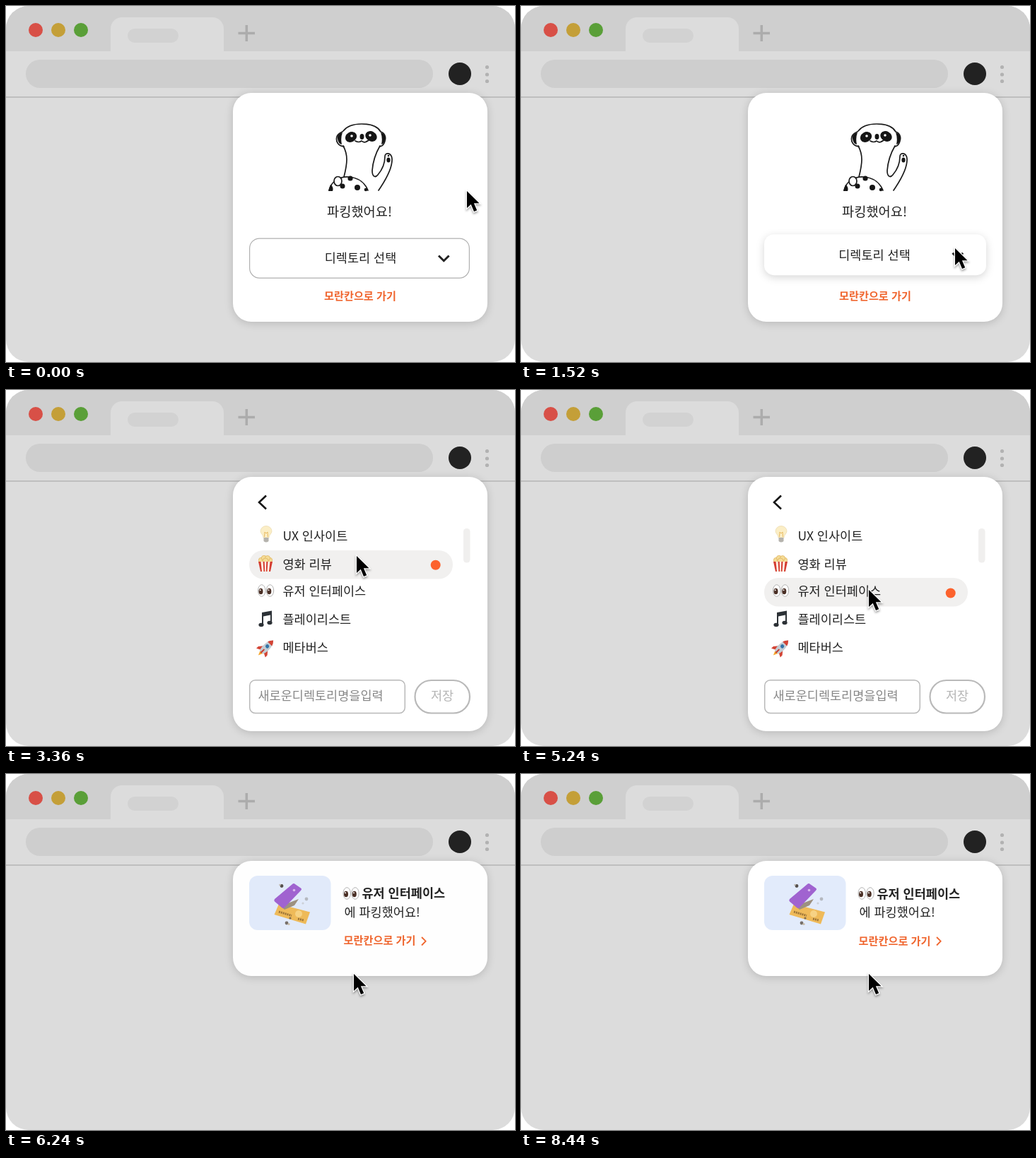
Recreate the animation shown at these times as an HTML page. Size 720 by 504 pixels, loop 8.48 s.

```html
<!DOCTYPE html>
<html lang="ko">
<head>
<meta charset="utf-8">
<style>
html, body { margin: 0; width: 100%; height: 100%; overflow: hidden; background: #fff; }
svg { display: block; width: 720px; height: 504px; }
text { font: 500 17.5px "Noto Sans CJK KR", "Noto Sans CJK JP", "Noto Sans CJK", sans-serif; fill: #222; }
.mid { text-anchor: middle; }
.link { font-size: 15.2px; font-weight: 700; fill: #f0662f; }
.panel { fill: #fff; filter: drop-shadow(0 2px 6px rgba(0,0,0,.16)); }
.line { fill: none; stroke: #1b1b1b; stroke-width: 1.7; stroke-linecap: round; stroke-linejoin: round; }
</style>
</head>
<body>
<svg viewBox="0 0 720 504">
  <defs>
    <clipPath id="frame"><rect width="720" height="504" rx="32"/></clipPath>
    <g id="eyes">
      <g id="eye">
        <ellipse cx="-5.8" rx="5.2" ry="8.3" fill="#fff" stroke="#aaa" stroke-width=".9"/>
        <ellipse cx="-7" cy="1" rx="3" ry="4.3" fill="#4a2f25"/>
        <circle cx="-7.8" cy="-.8" r="1" fill="#fff"/>
      </g>
      <use href="#eye" x="11.8"/>
    </g>
  </defs>

  <!-- browser window -->
  <g clip-path="url(#frame)">
    <rect width="720" height="504" fill="#dcdcdc"/>
    <rect width="720" height="64" fill="#cfcfcf"/>
    <path d="M148 64V32a16 16 0 0 1 16-16H292a16 16 0 0 1 16 16V64Z" fill="#dcdcdc"/>
    <rect x="172" y="32" width="72" height="20" rx="10" fill="#d2d2d2"/>
    <circle cx="42" cy="34" r="10" fill="#d85047"/>
    <circle cx="74" cy="34" r="10" fill="#c49f38"/>
    <circle cx="106" cy="34" r="10" fill="#5a9f38"/>
    <path d="M328.500 38.500H352M340.300 27V50" stroke="#acacac" stroke-width="3.500"/>
    <rect x="28" y="76" width="576" height="40" rx="20" fill="#cecece"/>
    <rect y="128" width="720" height="2" fill="#bebebe"/>
    <circle cx="642" cy="96" r="16" fill="#222"/>
    <g fill="#b2b2b2">
      <circle cx="680.500" cy="86.500" r="2.600"/><circle cx="680.500" cy="97" r="2.600"/><circle cx="680.500" cy="106.500" r="2.600"/>
    </g>
  </g>

  <!-- saved -->
  <g id="saved">
    <rect class="panel" x="321" y="123" width="360" height="324" rx="26"/>
    <g class="line">
      <path d="M478 199C470 198 466 192 468 185C470 179 474 180 477 177C483 169 493 167 503 167C515 167 525 169 530 178C535 179 538 185 536 191C535 196 533 198 529 199"/>
      <path d="M477 198C484 211 483 222 478 242M529 198C522 210 519 220 518 233C518 241 522 244 526 239C532 232 536 224 536 213C536 207 545 207 546 216C547 229 538 245 527 261"/>
      <path d="M457 261C460 247 474 241 485 242C499 243 508 251 512 261"/>
      <path d="M494 191Q499 194 503 191Q507 195 513 190"/>
      <ellipse cx="469.500" cy="248" rx="5.500" ry="6.500" fill="#fff"/>
    </g>
    <g fill="#151515">
      <path d="M476 179Q468 181 469 188Q470 195 475 196Q473 187 476 179ZM530 179Q538 182 536 189Q535 195 531 196Q533 187 530 179Z"/>
      <ellipse cx="488" cy="185.500" rx="8.500" ry="7" transform="rotate(-30 488 185.500)"/>
      <ellipse cx="516.500" cy="184.500" rx="8.500" ry="7" transform="rotate(30 516.500 184.500)"/>
      <ellipse cx="503.500" cy="185" rx="3" ry="4"/>
      <ellipse cx="541" cy="218" rx="2.600" ry="3.600"/>
      <circle cx="541" cy="212" r="1.300"/>
      <circle cx="487" cy="244" r="3.600"/><circle cx="476" cy="255" r="3.500"/>
      <circle cx="497" cy="257" r="4"/><path d="M456 262L459 253Q464 256 462 262Z"/><circle cx="509" cy="260" r="2.300"/>
    </g>
    <circle cx="489" cy="184" r="1.800" fill="#fff"/><circle cx="515" cy="183" r="1.800" fill="#fff"/>
    <text class="mid" x="500" y="298" style="font-size:18.700px">파킹했어요!</text>
    <rect id="button" fill="#fff"/>
    <g id="label">
      <text class="mid" x="501.500" y="362.500">디렉토리 선택</text>
      <path d="M612 353.500L619.300 360.700L626.600 353.500" fill="none" stroke="#222" stroke-width="3"/>
    </g>
    <text class="link mid" x="501" y="415.500">모란칸으로 가기</text>
  </g>

  <!-- directory list -->
  <g id="list">
    <rect class="panel" x="321" y="123" width="360" height="360" rx="26"/>
    <path d="M368 149.500L358 159L368 168.500" fill="none" stroke="#151515" stroke-width="2.600"/>
    <rect x="647" y="196" width="9.500" height="48.500" rx="4.500" fill="#f0efee"/>
    <g id="row2">
      <rect x="344" y="227" width="288" height="40.500" rx="20" fill="#f1f0ef"/>
      <circle cx="607.700" cy="247.700" r="7" fill="#fc622d"/>
    </g>
    <g id="row3">
      <rect x="344" y="266" width="288" height="40.500" rx="20" fill="#f1f0ef"/>
      <circle cx="607.700" cy="287.500" r="7" fill="#fc622d"/>
    </g>
    <g transform="translate(368 204)">
      <path d="M-4 5C-4 1-8-1-8-4A8 7.500 0 0 1 8-4C8-1 4 1 4 5Z" fill="#fbeec6" stroke="#ecdcb0" stroke-width=".8"/>
      <path d="M-2.500 4L-2-3L0-1L2-3L2.500 4" fill="none" stroke="#e6b453" stroke-width=".9"/>
      <path d="M-3.500 5H3.500V10Q0 13-3.500 10Z" fill="#b5b3ad"/>
    </g>
    <g transform="translate(367 246)">
      <g fill="#f5dc97" stroke="#d9a94f" stroke-width=".6">
        <circle cx="-6" cy="-5" r="3.700"/><circle cx="6" cy="-5" r="3.700"/><circle cx="-2" cy="-8" r="3.700"/><circle cx="3" cy="-8" r="3.500"/><circle cy="-4" r="4"/>
      </g>
      <path d="M-10-3H10L7 11H-7Z" fill="#d43d31"/>
      <path d="M-6.500-3H-3.500L-2.500 11H-5ZM3.500-3H6.500L5 11H2.500ZM-1.300-3H1.300L.8 11H-.8Z" fill="#fff3e6"/>
    </g>
    <use href="#eyes" x="367.500" y="284"/>
    <g transform="translate(367 324)" fill="#2c3136">
      <path d="M-5-9L9-11.500V6H7V-5.500L-3-3.500V9H-5Z"/>
      <ellipse cx="-6" cy="8.500" rx="3.600" ry="2.700"/><ellipse cx="6" cy="5.500" rx="3.600" ry="2.700"/>
    </g>
    <g transform="translate(367.500 365) rotate(45)">
      <path d="M-3 8L0 15L3 8Z" fill="#f6a52d"/>
      <path d="M-4 0L-9 6V10L-3 7ZM4 0L9 6V10L3 7Z" fill="#d34435"/>
      <path d="M0-15C6-9 6 1 3.500 9H-3.500C-6 1-6-9 0-15Z" fill="#c3ccd3"/>
      <path d="M0-15Q3.500-11.500 4.300-8H-4.300Q-3.500-11.500 0-15Z" fill="#d34435"/>
      <circle cy="-3" r="2.600" fill="#3274a8"/>
      <rect x="-1" y="3" width="2" height="7" fill="#c63b30"/>
    </g>
    <text x="391.500" y="213">UX 인사이트</text>
    <text x="391.500" y="252.500">영화 리뷰</text>
    <text x="391.500" y="291.300">유저 인터페이스</text>
    <text x="391.500" y="331.300">플레이리스트</text>
    <text x="391.500" y="371">메타버스</text>
    <rect x="344.700" y="410.700" width="219.600" height="46.800" rx="8" fill="none" stroke="#b8b8b8" stroke-width="1.500"/>
    <text x="356.500" y="439" fill="#888" style="fill:#888">새로운디렉토리명을입력</text>
    <rect x="578.500" y="411" width="77.500" height="46.500" rx="23.200" fill="none" stroke="#b9b9b9" stroke-width="2.200"/>
    <text class="mid" x="617" y="439.300" style="fill:#b5b5b5">저장</text>
  </g>

  <!-- result -->
  <g id="result">
    <rect class="panel" x="321" y="123" width="360" height="163" rx="26"/>
    <rect x="344" y="144" width="115.500" height="77" rx="12" fill="#e2ebfb"/>
    <path d="M386 184L430 195.500L424 212.500L379.500 199Z" fill="#efba59"/>
    <path d="M386 195L404 200.500M413 205L421 207" stroke="#9c7438" stroke-width="3" stroke-dasharray="2 1"/>
    <circle cx="414" cy="198" r="5" fill="#f7d284"/>
    <path d="M388 187L394 192L408 186L414 177Z" fill="#9d9180"/>
    <path d="M380 177L405 156Q407 154 409 156L417 161.500Q419 163 417 165L394 189Q392 191 390 189L380 180.500Q378.500 179 380 177Z" fill="#a063d0"/>
    <circle cx="407.500" cy="164.500" r="1.800" fill="#d9b8ef"/>
    <g>
      <circle cx="390" cy="158.500" r="2.400" fill="#55504c"/><circle cx="387.500" cy="157" r="1.300" fill="#c3bdb4"/>
      <circle cx="425" cy="177" r="2.400" fill="#b5b9c0"/><circle cx="420" cy="183" r="1.600" fill="#cbd0d8"/>
      <circle cx="397" cy="211" r="2.400" fill="#77706a"/><circle cx="400" cy="212.500" r="1.600" fill="#c9bda8"/>
      <circle cx="402" cy="204" r="1.600" fill="#7d6c55"/>
    </g>
    <use href="#eyes" x="488" y="169"/>
    <text x="503.500" y="175.500" style="font-weight:700">유저 인터페이스</text>
    <text x="478.500" y="202" style="font-weight:400">에 파킹했어요!</text>
    <text class="link" x="477.500" y="241.500">모란칸으로 가기</text>
    <path d="M588 231L593.700 236.700L588 242.500" fill="none" stroke="#f0662f" stroke-width="1.800"/>
  </g>

  <g id="cursor" style="filter:drop-shadow(0 2px 1.500px rgba(0,0,0,.35))">
    <path d="M1 2V26L6.700 20.800L11 31L15.200 29.200L10.900 19.200H18.500Z" stroke="#fff" stroke-width="2.600" paint-order="stroke"/>
  </g>
</svg>
<script>
const LOOP = 8480;
const el = id => document.getElementById(id);
const mix = (a, b, p) => a + (b - a) * p;
const ease = (t, from, to) => {
  const p = Math.min(1, Math.max(0, (t - from) / (to - from)));
  return p * p * (3 - 2 * p);
};
const set = (id, attrs) => {
  for (const k in attrs) el(id).setAttribute(k, attrs[k]);
};
const show = (id, opacity, y = 0) => {
  set(id, { opacity, transform: `translate(0 ${y})` });
  el(id).style.display = opacity > 0 ? "" : "none";
};

// cursor legs: start, end, dx, dy
const legs = [
  [200, 1000, -38, 81],
  [2720, 3280, -118, -108],
  [3700, 4350, -4, 48]
];

function draw(t) {
  let x = 651, y = 260;
  for (const [from, to, dx, dy] of legs) {
    const p = ease(t, from, to);
    x += dx * p;
    y += dy * p;
  }
  set("cursor", { transform: `translate(${x} ${y})` });

  const lift = ease(t, 850, 1100);
  set("button", {
    x: mix(344.6, 344, lift), y: mix(329.1, 323.2, lift),
    width: mix(310.800, 314, lift), height: mix(56, 58, lift),
    rx: 14, stroke: `rgba(176,176,176,${1 - lift})`, "stroke-width": 1.2
  });
  el("button").style.filter = `drop-shadow(0 3px 6px rgba(0,0,0,${0.16 * lift}))`;
  set("label", { transform: `translate(${-1.5 * lift} ${-3.7 * lift})` });

  const listIn = ease(t, 1980, 2640), resultIn = ease(t, 5540, 6260);
  show("saved", 1 - ease(t, 1840, 2120));
  show("list", listIn * (1 - ease(t, 5360, 5640)), -2.5 * (1 - listIn));
  show("result", resultIn, -2.5 * (1 - resultIn));

  const next = ease(t, 3960, 4160);
  show("row2", ease(t, 3080, 3280) * (1 - next));
  show("row3", next);
}

function tick() {
  draw(performance.now() % LOOP);
  requestAnimationFrame(tick);
}
tick();
</script>
</body>
</html>
```
